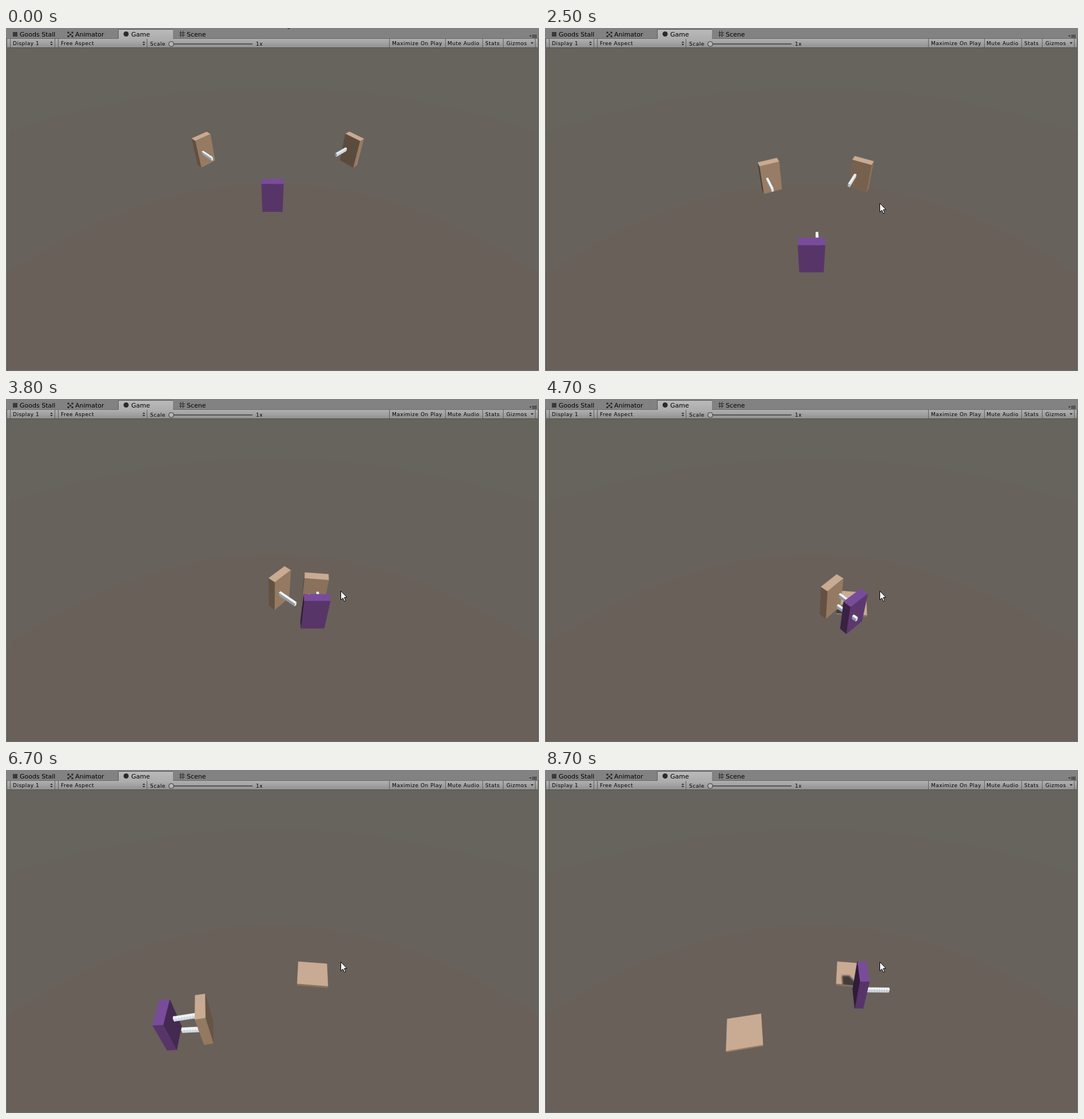
Recreate the animation shown at these times as an HTML page with a canvas. Size 932 by 601 pixels, loop 9000 ms.

```html
<!DOCTYPE html>
<html lang="en">
<head>
<meta charset="utf-8">
<title>Arena</title>
<style>
html, body { margin: 0; width: 932px; height: 601px; overflow: hidden; background: #828282; }
canvas { position: absolute; left: 0; top: 0; }
span { position: absolute; white-space: pre; color: #000; font-family: "DejaVu Sans", sans-serif; }
.tab { top: 6px; font-size: 11px; line-height: 11px; }
.bar { top: 23px; font-size: 9px; line-height: 9px; letter-spacing: .5px; }
.low { top: 24px; }
</style>
</head>
<body>
<canvas id="stage" width="932" height="601"></canvas>
<span class="tab" style="left:24px">Goods Stall</span>
<span class="tab" style="left:121px">Animator</span>
<span class="tab" style="left:219px">Game</span>
<span class="tab" style="left:316px">Scene</span>
<span class="bar" style="left:12px">Display 1</span>
<span class="bar" style="left:96px">Free Aspect</span>
<span class="bar low" style="left:252px">Scale</span>
<span class="bar low" style="left:437px">1x</span>
<span class="bar" style="left:675px">Maximize On Play</span>
<span class="bar" style="left:772px">Mute Audio</span>
<span class="bar" style="left:838px">Stats</span>
<span class="bar" style="left:875px">Gizmos</span>
<script>
const LOOP = 9000, STEP = 100;
const ctx = document.getElementById('stage').getContext('2d');

// Camera 10 up and 10 back, pitched 45 degrees down, 60 degree field of view
const EYE = [0, 10, -10], FOCAL = 489.3, HALF = Math.SQRT1_2;
const LIGHT = [.321, .766, -.557];

const TAN = { top: [201, 170, 146], side: [200, 164, 133] };
const PURPLE = { top: [121, 76, 155], side: [122, 74, 146] };
const WHITE = { top: [246, 247, 248], side: [290, 303, 318] };

const HERO_SPEED = .005, FOE_SPEED = .003, REACH = 1.2;
const CHASE_START = 1460;

// The hero runs straight to each place and takes the given heading
const orders = [
  { at: 1800, x: 0, z: -3.85, yaw: 0 },
  { at: 2650, x: 1.73, z: -2.76, yaw: 0 },
  { at: 3900, x: 1.73, z: -2.76, yaw: -42 },
  { at: 5000, x: -2, z: -5.36, yaw: -90 },
  { at: 5900, x: -3.78, z: -4.73, yaw: -90 },
  { at: 6400, x: -3.78, z: -4.73, yaw: 87 },
  { at: 7250, x: 2, z: -2.9, yaw: 91 }
];
const foes = [{ x: -4, z: 4, dead: 6900 }, { x: 4.6, z: 4, dead: 3850 }];

const dot = (a, b) => a[0] * b[0] + a[1] * b[1] + a[2] * b[2];
const toEye = p => EYE.map((v, i) => v - p[i]);
const distance = p => Math.hypot(...toEye(p));
const mix = (a, b, u) => a + (b - a) * u;
const clamp = u => Math.max(0, Math.min(1, u));
const gap = (a, b) => Math.hypot(a.x - b.x, a.z - b.z);

function step(from, to, length) {
  const u = clamp(length / (gap(from, to) || 1));
  return { x: mix(from.x, to.x, u), z: mix(from.z, to.z, u) };
}

function heroAt(t) {
  let place = { x: 0, z: 0 }, yaw = 0;
  orders.forEach((order, i) => {
    if (t < order.at) return;
    const end = Math.min(t, orders[i + 1]?.at ?? LOOP);
    place = step(place, order, (end - order.at) * HERO_SPEED);
    yaw = mix(yaw, order.yaw, clamp((t - order.at) / 100));
  });
  return { ...place, yaw: yaw * Math.PI / 180 };
}

// Foes run at the hero and stop within reach
function foeAt(foe, t) {
  const end = Math.min(t, foe.dead), dt = 10;
  let place = { x: foe.x, z: foe.z };
  for (let now = CHASE_START; now < end; now += dt) {
    const hero = heroAt(now), room = gap(place, hero) - REACH;
    if (room > 0) place = step(place, hero, Math.min(room, dt * FOE_SPEED));
  }
  const hero = heroAt(end);
  return { ...place, yaw: Math.atan2(hero.x - place.x, hero.z - place.z) };
}

const punch = (t, period, peak) => .42 * clamp(1 - Math.abs(t % period - peak) / 200);

function body(place, paint, squash, reach) {
  return { ...place, paint, squash, reach, sin: Math.sin(place.yaw), cos: Math.cos(place.yaw),
    w: mix(.5, .685, squash), d: mix(.18, .685, squash), h: mix(1.8, .1, squash) };
}

function fightersAt(t) {
  const hero = heroAt(t);
  const enemies = foes.map(foe => {
    const place = foeAt(foe, t), near = gap(place, hero) < REACH + .05;
    return body(place, TAN, clamp((t - foe.dead) / 100), near ? punch(t, 1000, 700) : 0);
  });
  const fighting = enemies.some(e => !e.squash && gap(e, hero) < REACH + .3);
  return { enemies, hero: body(hero, PURPLE, 0, fighting ? punch(t, 800, 300) : 0) };
}

function project([x, y, z]) {
  const dy = y - EYE[1], dz = z - EYE[2], depth = (dz - dy) * HALF;
  return [466 + FOCAL * x / depth, 317.5 - FOCAL * (dz + dy) * HALF / depth];
}

function trace(points) {
  points.forEach(([x, y], i) => i ? ctx.lineTo(x, y) : ctx.moveTo(x, y));
  ctx.closePath();
}

function polygon(points, color, edge = .5) {
  ctx.beginPath();
  trace(points);
  ctx.fillStyle = ctx.strokeStyle = color;
  ctx.fill();
  ctx.lineWidth = edge;
  ctx.stroke();
}

const toWorld = (b, [x, y, z]) => [b.x + b.cos * x + b.sin * z, y, b.z - b.sin * x + b.cos * z];
const toLocal = (b, p) => {
  const dx = p[0] - b.x, dz = p[2] - b.z;
  return [b.cos * dx - b.sin * dz, p[1], b.sin * dx + b.cos * dz];
};

function shade(paint, n) {
  const lit = n[1] > 0 ? 1 : .385 + .585 * Math.max(0, dot(n, LIGHT));
  const base = n[1] > 0 ? paint.top : paint.side;
  return `rgb(${base.map(v => Math.min(255, Math.round(v * lit)))})`;
}

// lo and hi are opposite corners in the frame of the fighter
function cuboid(b, lo, hi, paint) {
  for (let axis = 0; axis < 3; axis++) {
    for (const sign of [-1, 1]) {
      const n = [0, 0, 0];
      n[axis] = sign;
      const tip = toWorld(b, n), normal = [tip[0] - b.x, tip[1], tip[2] - b.z];
      const u = (axis + 1) % 3, v = (axis + 2) % 3;
      const corners = [[lo, lo], [hi, lo], [hi, hi], [lo, hi]].map(([p, q]) => {
        const c = [0, 0, 0];
        c[axis] = (sign < 0 ? lo : hi)[axis];
        c[u] = p[u];
        c[v] = q[v];
        return toWorld(b, c);
      });
      if (dot(toEye(corners[0]), normal) > 0) polygon(corners.map(project), shade(paint, normal));
    }
  }
}

const drawBody = b => cuboid(b, [-b.w, 0, -b.d], [b.w, b.h, b.d], b.paint);

function castShadow(plate, caster) {
  const rim = (b, y) => [[-1, -1], [1, -1], [1, 1], [-1, 1]].map(([x, z]) => toWorld(b, [x * b.w, y, z * b.d]));
  ctx.save();
  ctx.beginPath();
  trace(rim(plate, plate.h).map(project));
  ctx.clip();
  ctx.beginPath();
  for (let u = 0; u <= 1; u += .1) {
    trace(rim(caster, plate.h).map(([x, y, z]) => project([x - .43 * u, y, z + .71 * u])));
  }
  ctx.filter = 'blur(1.5px)';
  ctx.fillStyle = '#403d3d';
  ctx.fill();
  ctx.restore();
}

// Arms are cut into short pieces so that they can pierce a body
function armPieces(b) {
  return Array.from({ length: 10 }, (_, i) => {
    const z = .12 + b.reach + i * .1;
    return { b, lo: [.18, .84, z], hi: [.28, 1.02, z + .1], mid: toWorld(b, [.23, .93, z + .05]) };
  });
}

// 1 when the body hides the point, -1 when the point is inside the body
function hiding(b, point) {
  const p = toLocal(b, point), eye = toLocal(b, EYE);
  if (Math.abs(p[2]) < b.d) return Math.abs(p[0]) < b.w ? -1 : 0;
  return Math.sign(p[2]) !== Math.sign(eye[2]) || Math.abs(eye[2]) < b.d ? 1 : 0;
}

function drawFighters(t) {
  const { enemies, hero } = fightersAt(t);
  for (const b of enemies.filter(b => b.squash)) {
    drawBody(b);
    castShadow(b, hero);
  }
  const middle = b => distance([b.x, .9, b.z]);
  const bodies = [...enemies.filter(b => !b.squash), hero].sort((a, b) => middle(b) - middle(a));
  const layers = Array.from({ length: bodies.length + 1 }, () => []);
  for (const piece of bodies.flatMap(armPieces)) {
    const sides = bodies.map(b => hiding(b, piece.mid));
    if (sides.includes(-1)) continue;
    const i = sides.indexOf(1);
    layers[i < 0 ? bodies.length : i].push(piece);
  }
  layers.forEach((pieces, i) => {
    pieces.sort((a, b) => distance(b.mid) - distance(a.mid));
    for (const p of pieces) cuboid(p.b, p.lo, p.hi, WHITE);
    if (bodies[i]) drawBody(bodies[i]);
  });
}

function rect(x, y, w, h, color) {
  ctx.fillStyle = color;
  ctx.fillRect(x, y, w, h);
}

function disc(x, y, r, color) {
  ctx.beginPath();
  ctx.arc(x, y, r, 0, 7);
  ctx.fillStyle = color;
  ctx.fill();
}

function fade(y, h, from, to) {
  const paint = ctx.createLinearGradient(0, y, 0, y + h);
  paint.addColorStop(0, from);
  paint.addColorStop(1, to);
  return paint;
}

function drawSky() {
  rect(0, 34, 932, 567, '#66645c');
  const band = (middle, edge, color) => {
    ctx.beginPath();
    ctx.moveTo(0, edge);
    ctx.quadraticCurveTo(466, 2 * middle - edge, 932, edge);
    ctx.lineTo(932, 601);
    ctx.lineTo(0, 601);
    ctx.fillStyle = color;
    ctx.fill();
  };
  band(105, 184, '#67625b');
  band(272, 432, '#69605a');
}

function drawIcons(ink) {
  rect(12, 7, 8, 8, '#3a3a3a');
  disc(112.5, 11.5, 1.8, ink);
  for (const x of [109, 116]) for (const y of [8, 14.5]) disc(x, y, 1.8, ink);
  disc(210, 10.5, 4.5, ink);
  for (const k of [0, 4]) {
    rect(305 + k, 5, 1, 11, ink);
    rect(303, 8 + k, 10, 1, ink);
  }
}

function drawPanel() {
  const ink = '#2b2b2b', rim = '#5a5a5a';
  rect(0, 0, 932, 18, '#828282');
  rect(2, 18, 928, 16, fade(18, 16, '#b2b2b2', '#929292'));
  rect(2, 18, 928, 1, '#6a6a6a');
  rect(196, 2, 96, 16, rim);
  rect(197, 3, 95, 16, fade(3, 15, '#bababa', '#aeaeae'));
  rect(2, 34, 928, 1, '#515151');
  for (const x of [0, 931]) rect(x, 18, 1, 583, '#828282');
  for (const x of [1, 930]) rect(x, 18, 1, 583, rim);
  rect(0, 600, 932, 1, '#747474');
  for (const x of [7, 85, 91, 246, 670, 768, 833, 869, 925]) rect(x, 19, 1, 15, '#606060');
  drawIcons(ink);

  rect(289, 27, 142, 2, '#555');
  disc(289, 28, 4.8, '#3f3f3f');
  disc(289, 28, 3.7, '#b5b5b5');

  const triangle = (x, y, w, h) => polygon([[x - w, y], [x + w, y], [x, y + h]], ink, .1);
  for (const x of [79.5, 241]) {
    triangle(x, 26, 2.3, -2.6);
    triangle(x, 28, 2.3, 2.6);
  }
  triangle(920, 25, 2.5, 3);
  triangle(917, 13, 2, 2.5);
  for (const y of [12, 14, 16]) rect(920, y, 8, 1, ink);
}

const mouseStops = [
  { at: 100, x: 487, z: -17 }, { at: 200, x: 490, z: -30 }, { at: 1100, x: 615, z: 45 },
  { at: 1800, x: 556, z: 87 }, { at: 2300, x: 585, z: 300 }, { at: 3400, x: 585, z: 336 }
];

function drawMouse(t) {
  let { x, z: y } = mouseStops[0];
  mouseStops.slice(1).forEach((stop, i) => {
    const start = mouseStops[i].at, u = clamp((t - start) / (stop.at - start));
    x = mix(x, stop.x, u);
    y = mix(y, stop.z, u);
  });
  ctx.save();
  ctx.translate(x + .5, y + .5);
  ctx.beginPath();
  trace([[0, 0], [0, 15.5], [3.6, 12.2], [6.2, 18], [8.5, 17], [6, 11.3], [10.5, 11]]);
  ctx.fillStyle = '#fff';
  ctx.strokeStyle = '#000';
  ctx.lineWidth = 1;
  ctx.fill();
  ctx.stroke();
  ctx.restore();
}

function frame(now) {
  const t = Math.floor((now % LOOP) / STEP) * STEP;
  drawSky();
  drawFighters(t);
  drawPanel();
  drawMouse(t);
  requestAnimationFrame(frame);
}
frame(0);
</script>
</body>
</html>
```
